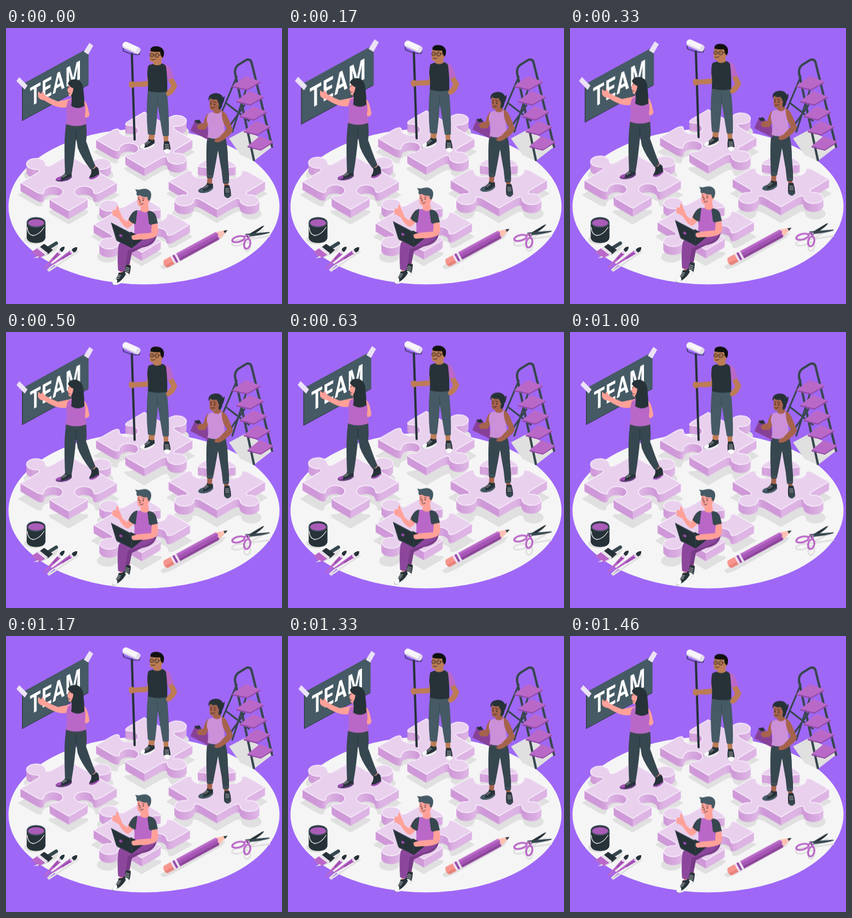
An HTML page for the animation above (1.5 s loop, 500 px wide and 500 px high).

```html
<!DOCTYPE html>
<html lang="en">
<head>
<meta charset="utf-8">
<title>Team puzzle</title>
<style>
html, body { margin: 0; height: 100%; overflow: hidden; background: #9f67f6; }
svg { display: block; width: 100vw; height: 100vh; }
#banner { transform-origin: 88px 98px; }
.line { fill: none; stroke-linecap: round; stroke-linejoin: round; }
.pink { fill: #ffa199; }
.tan { fill: #bd7c55; }
.brown { fill: #a5634d; }
.ink { fill: #263238; }
.slate { fill: #37474f; }
.steel { fill: #455a64; }
.mauve { fill: #ba68c8; }
.shade { fill: #e0e0e0; }
.sole { fill: var(--sole, #f5f5f5); }
</style>
</head>
<body>
<svg viewBox="0 0 500 500" xmlns="http://www.w3.org/2000/svg">
<defs>
  <g id="side">
    <path class="ink" d="M17 0Q22 3 27 1L27.500 10Q22 17 13 18Q3 20 0 16Q-1 12 8 9Q14 5 17 0Z"/>
    <path fill="currentColor" d="M9 8.500Q1 10 0 15Q3 18 8 16Q11 12 9 8.500Z"/>
    <path class="sole" d="M0 14.500Q2 17.500 12 15.500Q21 13 27.500 7V10.500Q22 17.500 12 18.700Q1 20 0 14.500Z"/>
    <path class="line" stroke="#ddd" stroke-width=".9" d="M10 8L14 10M12.500 6L16.500 8M14.500 4L18.500 6"/>
  </g>
  <g id="front">
    <path class="ink" d="M1.500 1H10Q13.500 11 13 20Q7 27 1 20Q-.500 10 1.500 1Z"/>
    <path fill="currentColor" d="M1 17Q7 13 13 17V20Q7 28 1 20Z"/>
    <path class="line" stroke="#ddd" stroke-width=".9" d="M3 7H9.500M3 10H10M3 13H10.500"/>
  </g>
</defs>

<rect width="500" height="500" fill="#9f67f6"/>
<ellipse cx="250" cy="323.500" rx="245.500" ry="141" fill="#f5f5f5"/>
<g id="shadows" class="shade">
  <path d="M404 200L434 184L485 213L449 241L425 230Z"/>
  <path d="M280 431Q280 436 286 437L300 432L392 380L398 371L380 374Z"/>
  <path class="line" stroke="#e0e0e0" stroke-width="3" d="M436 384L466 367M436 383L477 377"/>
  <ellipse cx="421" cy="389" rx="12" ry="5" fill="none" stroke="#e0e0e0" stroke-width="3" transform="rotate(-12 421 389)"/>
  <ellipse cx="437" cy="396" rx="5.500" ry="8" fill="none" stroke="#e0e0e0" stroke-width="3" transform="rotate(12 437 396)"/>
  <ellipse cx="51" cy="383" rx="18" ry="9"/>
</g>

<g id="banner">
  <path class="ink" d="M29 101V168.500L149 103.500V101Z"/>
  <path class="steel" d="M30 101.500L149.500 36V102.500L30 167Z"/>
  <text transform="matrix(.68 -.375 0 1 43 143)" font-family="Roboto, Arial, sans-serif" font-weight="700" font-size="48" letter-spacing="2" fill="#fff">TEAM</text>
  <path fill="#ebe2f6" d="M24 89L39 104L34 111.500L19 96ZM151 27L158 32L149 48L141 43Z"/>
</g>

<g id="ladder">
  <path class="line" stroke="#37474f" stroke-width="3.200" d="M418 88L391 152M441 92L410 188M400 137L440 168M399 186L432 140"/>
  <path class="line" stroke="#37474f" stroke-width="4.200" d="M449 239L415 82Q414 71 422 66L435 58Q443 55 445 63L482 215"/>
  <g id="steps"></g>
</g>

<g id="paint">
  <path class="ink" d="M37.500 352V380Q39 389 54.500 389.500Q70 389 71.500 380V352Z"/>
  <ellipse class="steel" cx="54.500" cy="352" rx="17" ry="9.500"/>
  <ellipse class="ink" cx="54.500" cy="352" rx="15.500" ry="8"/>
  <ellipse cx="54.500" cy="353" rx="14.500" ry="6.800" fill="#a95cb8"/>
  <path class="line" stroke="#e6e6e6" stroke-width="1.300" d="M38.500 361Q39 374 49 376Q60 375 69 361"/>
  <path class="shade" d="M50 417L68 415L90 404L96 393L86 398Z"/>
  <path class="line" stroke="#37474f" stroke-width="6.500" d="M78 398L91 390"/>
  <path class="ink" d="M61 397L69 391L85 402L76 410Z"/>
  <path fill="#e8e0ec" d="M57 399L61 396L76 408L72 411Z"/>
  <path class="mauve" d="M45 407L56 399L71 411L60 417L58 413L53 414L52 409Z"/>
  <path class="line" stroke="#e0e0e0" stroke-width="3" d="M76 438L110 408M78 440L130 405"/>
  <path class="mauve" d="M68 434L93 406L99 410L69 436ZM69 438L116 403L120 409Z"/>
  <path class="line" stroke="#9c4fae" stroke-width="3.400" d="M86 418L96 407.500M103 417L118 406"/>
  <path class="line" stroke="#e7d2ec" stroke-width="4" d="M96 407L99 404M118 406L121 404"/>
  <path class="ink" d="M97 402Q99 396 106 396Q107 401 101 406ZM119 402Q122 397 129 397Q130 404 123 407Z"/>
</g>

<g class="float" data-piece="250.5 202.5 -1 1 1 -1">
  <path class="line" stroke="#263238" stroke-width="4" d="M228 47L233 202"/>
  <path class="line" stroke="#37376b" stroke-width="1.700" d="M212 36L213 42L229 48L241 48L243 42"/>
  <path class="line" stroke="#f7f5fa" stroke-width="12" d="M217 31L237 40"/>
  <path class="line" stroke="#dcd3e6" stroke-width="3" d="M213 35L235 45"/>
  <ellipse cx="239.500" cy="41.500" rx="3.800" ry="6" fill="#e3daec" transform="rotate(24 239.500 41.500)"/>
  <path class="tan" d="M259 190H270L268 205Q262 209 258 203ZM285 194H294V208Q289 211 286 207Z"/>
  <use href="#side" x="242" y="201" color="#fafafa"/>
  <use href="#front" x="285" y="204" color="#fafafa"/>
  <path class="steel" d="M257 112H291Q296 155 295 195Q289 197 284 195L275 140Q273 170 270 193Q263 195 257 192Q253 150 257 112Z"/>
  <path class="line" stroke="#37474f" d="M274 124L275 142"/>
  <path class="tan" d="M291 88L300 86Q307 98 310 104Q308 113 299 121Q294 125 290 121Q289 115 297 109L299 105Z"/>
  <path class="mauve" d="M284 65Q294 66 298 73L304 90Q297 95 290 92Z"/>
  <path class="tan" d="M259 69Q255 74 256 96L233 98Q227 95 223 98Q221 106 227 109L236 106Q254 108 260 103Z"/>
  <path class="ink" d="M258 68Q264 65 268 65Q275 69 281 64Q288 65 290 70Q293 95 292 115Q275 119 257 114Q258 95 256 86Q256 73 258 68Z"/>
  <path class="tan" d="M267 59L281 54L282 65Q275 70 267 66Z"/>
  <path class="tan" d="M262 40Q259 52 261 60Q267 65 275 61Q285 57 286 48L282 39Z"/>
  <path fill="#111" d="M262 42Q260 34 271 33Q283 33 286 42Q287 49 284 54L281 51L279 43Q271 44 262 42Z"/>
  <g class="line" stroke="#222" stroke-width="1">
    <circle cx="264" cy="49" r="3.400"/><circle cx="273" cy="49.500" r="3.600"/>
    <path d="M277 49L283 48M263 57Q267 59 270 56.500"/>
  </g>
  <circle cx="264" cy="49" r=".8"/><circle cx="272" cy="49.500" r=".8"/>
</g>

<g class="float" data-piece="113.5 280.5 1 1 -1 -1">
  <path class="pink" d="M108 260H118L117 270H107ZM153 253L162 249L165 257L156 260Z"/>
  <g transform="translate(90 261.500) scale(1.060 .88)" style="--sole:#5b3a75"><use href="#side" color="#a24fb4"/></g>
  <path class="ink" d="M154 255Q159 257 163 251Q168 253 168 258L169 265Q162 274 153 274Q149 272 152 268Q156 263 154 255Z"/>
  <path fill="#a24fb4" d="M150 271Q157 273 169 264V266Q161 275 153 274Q150 273 150 271Z"/>
  <path class="slate" d="M109 171Q127 178 145 171Q147 195 145 205L148 213Q155 234 162 250Q158 256 153 256Q136 234 130 217L127 199Q124 235 119 264Q112 267 107 263Q105 215 107 190Z"/>
  <path class="line" stroke="#263238" d="M126 184L127 203"/>
  <path class="pink" d="M139 130Q147 133 150 152Q153 160 147 162L139 165L137 158L143 153Z"/>
  <path class="pink" d="M118 128L94 133Q81 128 71 122L66 114L64 119L58 115L58 124Q60 130 69 131Q85 141 94 143Q106 146 117 142Z"/>
  <path class="mauve" d="M112 132Q118 128 124 130L140 130Q146 144 143 158L146 174Q127 181 108 174Q112 160 109 144Z"/>
  <path class="pink" d="M114 103L112 110L111 114L113 116Q112 124 118 124L119 131L128 132V103Z"/>
  <path class="ink" d="M112 101Q115 92 126 93Q138 95 140 109Q142 124 142 141Q130 149 118 141Q120 130 118 122Q122 116 122 109Q117 108 112 101Z"/>
  <path class="line" stroke="#263238" d="M113 108L115 107M113.500 119L116 118.500"/>
</g>

<g class="float" data-piece="382 278 -1 -1 1 1">
  <path class="brown" d="M365 268H374L373 284Q368 288 364 284ZM395 281H403V290H396Z"/>
  <g transform="translate(348.500 280.500) scale(.97)" style="--sole:#455a64"><use href="#side" color="#455a64"/></g>
  <use href="#front" x="394.500" y="284" color="#37474f"/>
  <path class="slate" d="M366 196Q380 201 397 196Q402 215 402 240L404 266Q398 270 392 267L384 222Q380 245 375 271Q369 274 364 271Q362 222 364 204Z"/>
  <path class="slate" d="M391 262L404 264V280Q398 284 393 281Z"/>
  <path class="line" stroke="#546e7a" d="M365 267Q370 270 375 268M393 278Q398 280 404 277"/>
  <path fill="#874197" d="M343 166L365 179L367 203L334 186Z"/>
  <path class="ink" d="M341 168L350 166L354 172L346 173Z"/>
  <path class="brown" d="M366 154Q360 161 358 172L350 174L345 178L349 184L361 184Q367 175 371 168Z"/>
  <path fill="#cb90d8" d="M368 154Q375 151 379 153Q386 156 390 150Q396 154 395 168Q394 180 398 197Q380 204 365 198Q369 181 364 169Q363 159 368 154Z"/>
  <path class="brown" d="M391 150Q398 153 402 162L411 184Q410 192 392 204Q383 210 377 205Q380 199 386 198L400 183L394 172Q390 160 391 150Z"/>
  <path class="brown" d="M375 143L387 140L390 151Q384 158 376 153Z"/>
  <path class="brown" d="M370 125Q367 144 371 148Q376 152 382 148Q391 141 388 127Z"/>
  <path class="ink" d="M367 132Q365 119 380 118Q390 118 393 126L396 123Q396 132 392 138Q391 147 386 148Q384 144 386 139Q384 132 381 129Q374 131 370 127Z"/>
  <g class="line" stroke="#2b1d1c" stroke-width=".9">
    <path d="M370 134L372.500 133.500M376 133.500L380 135M371.500 144Q375 146 378 143.500"/>
  </g>
  <circle cx="371.500" cy="137.500" r=".9"/><circle cx="378" cy="138.500" r=".9"/>
</g>

<g class="float" data-piece="246 356 1 -1 -1 1">
  <path class="pink" d="M206 436H215L214 448L206 450ZM217 424H224L225 432H217Z"/>
  <g transform="translate(217 426) rotate(20)"><use href="#front" color="#fafafa"/></g>
  <path fill="#783b87" d="M273 376Q270 394 246 398L228 407L224 428Q218 431 213 427L214 400Z"/>
  <path fill="#8c479d" d="M236 374L272 372Q270 388 246 395L221 403L215 440Q209 443 203 439Q201 410 204 393Q207 386 220 384Z"/>
  <g transform="translate(187.500 449) rotate(-20) scale(1.050)"><use href="#side" color="#fafafa"/></g>
  <path class="pink" d="M226 338L237 347Q229 358 221 363Q213 361 204 345L193 339Q191 332 195 329L199 330L200 323Q204 321 204 328L207 334L211 344L219 351Z"/>
  <path class="mauve" d="M234 332Q241 329 248 331L259 331Q269 337 274 375Q256 387 231 378Q235 362 230 345Z"/>
  <path class="slate" d="M238 330Q228 331 222 347Q227 354 235 355ZM256 331Q268 330 272 341L275 354Q267 360 259 355Z"/>
  <path class="ink" d="M203 386L226 369L250 381L228 399Z"/>
  <path class="slate" d="M190 352L226 371L229 398L203 387Q200 386 199 382Z"/>
  <path class="ink" d="M191 354L225 372L228 398L204 386Q201 385 200 381Z"/>
  <ellipse cx="208" cy="376" rx="3.200" ry="2.300" fill="#954ba6" transform="rotate(30 208 376)"/>
  <path class="pink" d="M264 356L274 354Q278 371 271 378Q258 384 245 383L231 384Q226 381 228 376L239 373L263 371Z"/>
  <path class="pink" d="M244 320L257 316L259 331Q252 337 244 331Z"/>
  <path class="pink" d="M239 300Q236 318 240 322Q247 327 254 322L260 314Q264 308 259 300Z"/>
  <path class="steel" d="M234 292Q240 294 245 292Q257 289 262 297Q265 305 260 313L257 312L256 306Q248 307 243 303L238 304Q235 300 237 298Z"/>
  <path class="line" stroke="#263238" stroke-width=".9" d="M239 308L241.500 307M247 308.500L250.500 309M243 319Q246 321 249 318M243.500 312L242 315.500L244 316"/>
  <circle cx="241" cy="311" r=".9"/><circle cx="248.500" cy="312" r=".9"/>
</g>

<g class="float">
  <g transform="translate(290 427) rotate(-28.600)">
    <path fill="#f7958d" d="M15 -7.500H-1Q-8 0 -1 7.500H15Z"/>
    <path fill="#e8827a" d="M15 2H-4Q-3 6 -1 7.500H15Z"/>
    <path fill="#ecdff0" d="M13 -7.500H26V7.500H13Z"/>
    <path fill="#954ba6" d="M17 -7.500H21V7.500H17Z"/>
    <path class="mauve" d="M25 -7.500H106L109 -3L106 2L108 6L105 7.500H25Z"/>
    <path fill="#a456b4" d="M25 -3H108L106 3H25Z"/>
    <path fill="#8c4499" d="M25 3H106L105 7.500H25Z"/>
    <path fill="#ffc0b2" d="M106 -7.500L122 -2V2L105 7.500L108 5L106 2L109 -3Z"/>
    <path class="ink" d="M120 -2.800L127 0L120 2.800Z"/>
  </g>
</g>

<g class="float">
  <path class="ink" d="M434 377L464 359L468 358Q462 367 438 380Z"/>
  <path class="slate" d="M433 373L477 369.500L478 371Q464 376 437 378Z"/>
  <g fill="none" stroke="#ba68c8" stroke-width="3.400">
    <ellipse cx="421" cy="382.500" rx="11.500" ry="5" transform="rotate(-14 421 382.500)"/>
    <ellipse cx="437" cy="391" rx="5.500" ry="9" transform="rotate(14 437 391)"/>
    <path d="M430 379L438 375M439 383L440 377"/>
  </g>
  <circle cx="440" cy="376" r="1.300" fill="#cfd8dc"/>
</g>
</svg>

<script>
const NS = "http://www.w3.org/2000/svg";
const LOOP = 1500, THICK = 15;

function add(parent, d, attrs = {}) {
  const p = document.createElementNS(NS, "path");
  p.setAttribute("d", d);
  for (const k in attrs) p.setAttribute(k, attrs[k]);
  parent.append(p);
}
const poly = pts => "M" + pts.map(p => p.map(v => v.toFixed(2))).join("L") + "Z";

// One side of a piece: [position along the edge, distance outwards].
function profile() {
  const half = [[-1, 0]], r = .28, c = .36, s = r * Math.SQRT1_2;
  for (let i = 0; i < 8; i++) {
    const t = i / 8, u = 1 - t;
    const mix = (a, b, c, d) => u*u*u*a + 3*u*u*t*b + 3*u*t*t*c + t*t*t*d;
    half.push([mix(-.36, -.18, -.1, -s), mix(0, 0, .065, c - s)]);
  }
  for (let i = 0; i < 14; i++) {
    const a = (225 - i * 135 / 14) * Math.PI / 180;
    half.push([r * Math.cos(a), c + r * Math.sin(a)]);
  }
  const mirror = half.slice(1).reverse().map(([t, n]) => [-t, n]);
  return [...half, [0, c + r], ...mirror];
}
const edge = profile();
const sides = [
  (t, n) => [-1 - n, -t],
  (t, n) => [t, -1 - n],
  (t, n) => [1 + n, t],
  (t, n) => [-t, 1 + n]
];

function outline(cx, cy, tabs, size = 1) {
  return tabs.flatMap((sign, i) => edge.map(([t, n]) => {
    const [a, b] = sides[i](t, n * sign);
    return [cx + (a - b) * 43.5 * size, cy + (a + b) * 25.2 * size];
  }));
}

// Wall colour by facing: -0.5 and below is left, 0.5 and above is right.
function tint(facing) {
  const k = Math.min(1, Math.max(0, facing + .5));
  const left = [207, 152, 216], right = [221, 180, 228];
  return `rgb(${left.map((v, i) => Math.round(v + (right[i] - v) * k))})`;
}

function puzzle(group) {
  const [cx, cy, ...tabs] = group.dataset.piece.split(" ").map(Number);
  add(document.getElementById("shadows"), poly(outline(cx, cy + 22, tabs, 1.06)));
  const pts = outline(cx, cy, tabs);
  const body = document.createElementNS(NS, "g");
  const walls = [];
  pts.forEach((p, i) => {
    const q = pts[(i + 1) % pts.length], dx = q[0] - p[0], dy = q[1] - p[1];
    if (dx < 0) walls.push({ p, q, y: Math.max(p[1], q[1]), facing: dy / Math.hypot(dx, dy) });
  });
  walls.sort((a, b) => a.y - b.y);
  for (const { p, q, facing } of walls) {
    const fill = tint(facing);
    add(body, poly([p, q, [q[0], q[1] + THICK], [p[0], p[1] + THICK]]),
      { fill, stroke: fill, "stroke-width": .5 });
  }
  add(body, poly(pts), { fill: "#e9d1ee", stroke: "#fbf5fc", "stroke-width": 1.3, "stroke-linejoin": "round" });
  group.prepend(body);
}
document.querySelectorAll("[data-piece]").forEach(puzzle);

const steps = document.getElementById("steps");
for (let i = 0; i < 5; i++) {
  const x = 410 + i * 6.9, y = 105 + i * 27.2, w = 51 - i * 1.2;
  const left = [x, y], right = [x + w, y - 8], front = [x + w * .52, y + 6];
  const drop = ([px, py]) => [px, py + 2.5];
  add(steps, poly([left, [x + w * .48, y - 18], right, front]), { fill: "#ba68c8" });
  add(steps, poly([left, front, right, drop(right), drop(front), drop(left)]), { fill: "#954ba6" });
}

const timing = { duration: LOOP, iterations: Infinity };
const rise = [0, -10, 0].map(y => ({ transform: `translateY(${y}px)` }));
document.querySelectorAll(".float").forEach(g => g.animate(rise, timing));

const beat = [[0, 1], [.1, 1.1], [.3, 1], [.4, 1], [.5, 1.1], [.6, 1], [1, 1]];
document.getElementById("banner").animate(
  beat.map(([offset, s]) => ({ offset, transform: `scale(${s})` })), timing);
</script>
</body>
</html>
```
